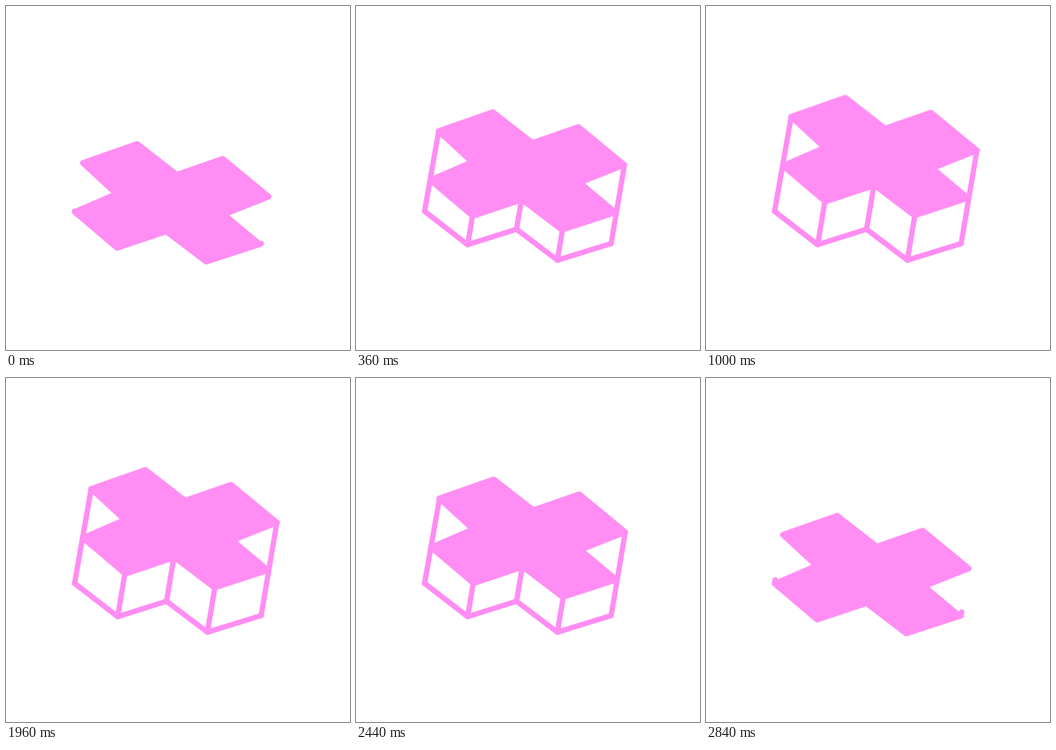
Animation of 480x480 px, one loop 2880 ms. Source, as an HTML page:

```html
<!DOCTYPE html>
<html lang="en">
<head>
<meta charset="utf-8">
<title>Rising cross</title>
<style>
  html, body { margin: 0; width: 100%; height: 100%; overflow: hidden; background: #fff; }
  svg {
    display: block; width: 100%; height: 100%;
    fill: none; stroke: #ff8df3; stroke-width: 7.4;
    stroke-linecap: round; stroke-linejoin: round;
  }

  /* Half a loop each way: rise and hold, then the same in reverse. */
  .top, .edge { animation: rise 1440ms infinite alternate; }
  .top { fill: #ff8df3; stroke-width: 8; }
  .edge { animation-name: grow; stroke-dasharray: 1 2; }

  @keyframes rise {
    0% { transform: translate(0, 0); animation-timing-function: cubic-bezier(.33, 0, .06, 1); }
    69.44%, 100% { transform: translate(11.5px, -64.5px); }
  }
  @keyframes grow {
    0% { stroke-dashoffset: 1; animation-timing-function: cubic-bezier(.16, 0, .11, 1); }
    55.56%, 100% { stroke-dashoffset: 0; }
  }
</style>
</head>
<body>
<svg viewBox="0 0 480 480">
  <!-- base outline and the front uprights -->
  <path d="M95.7 286.5 155.8 333 224 311.5 281 354.6 356 331.5"/>
  <path d="M155.8 333l10.4-62M224 311.5l10.4-62M281 354.6l10.4-62"/>
  <!-- outer uprights -->
  <path class="edge" pathLength="1" d="M95.7 286.5 118.8 155"/>
  <path class="edge" pathLength="1" d="M356 331.5 378 201.5"/>
  <!-- lid -->
  <path class="top" d="M107.3 219 183 192.5 238.2 235.5 302.3 213.2 366.5 266 304.1 290.8
    354 332.5 279.5 356.7 223.8 314.5 155 337.5 96 287.5 154.4 262.2Z"/>
</svg>
</body>
</html>
```
